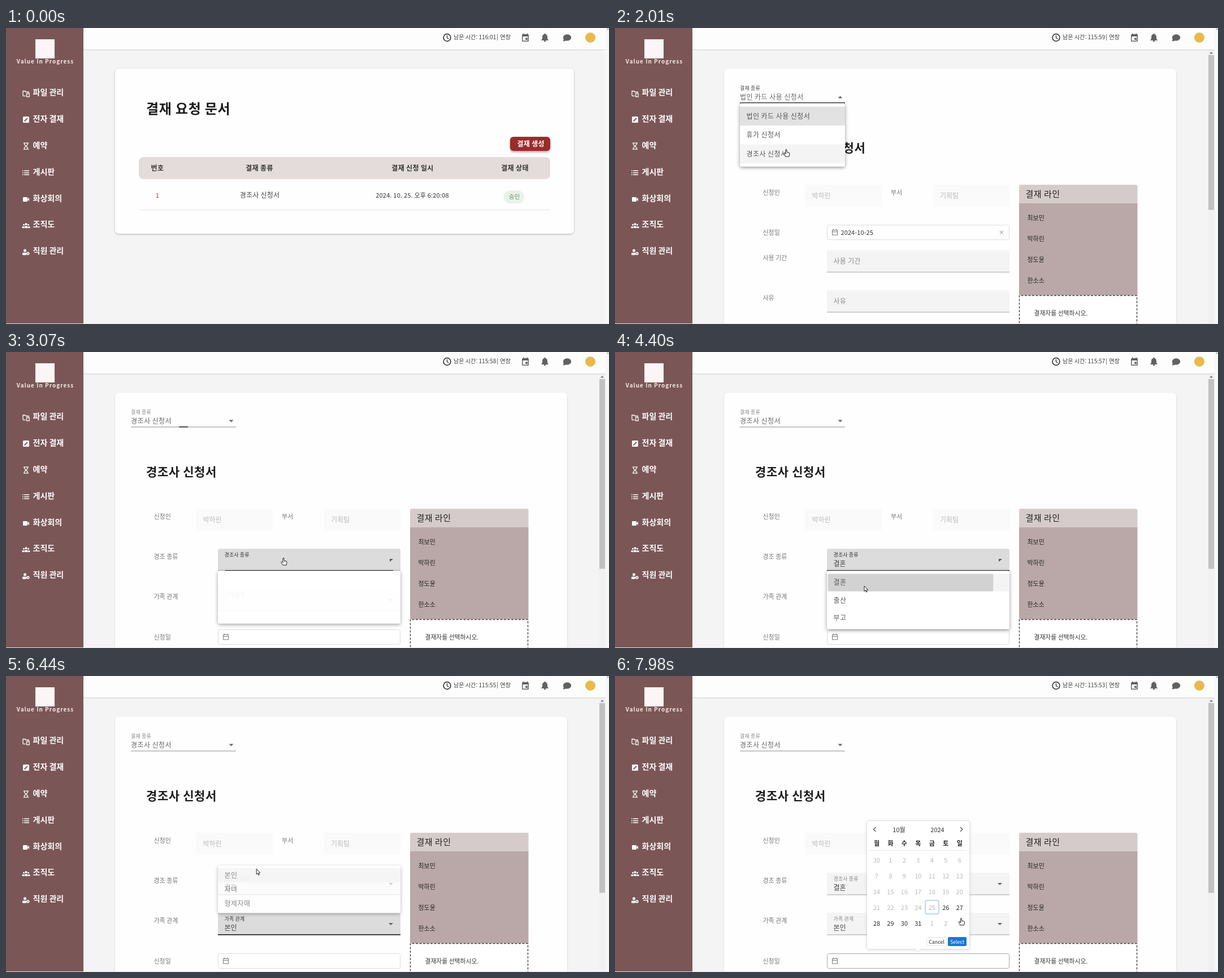
An HTML page with a canvas for the animation above (8 s loop, 1067 by 525 pixels).

```html
<!DOCTYPE html>
<html lang="ko">
<head>
<meta charset="utf-8">
<title>결재 신청</title>
<style>
html, body { margin: 0; width: 100%; height: 100%; overflow: hidden; background: #f4f4f4; }
canvas { display: block; width: 1067px; height: 525px; }
</style>
</head>
<body>
<canvas id="stage" width="1067" height="525"></canvas>
<script>
const g = document.getElementById('stage').getContext('2d');
const LOOP = 8000;
const FONT = '"Noto Sans CJK KR", "Noto Sans CJK", "Noto Sans", sans-serif';
const USER = '박하린', TEAM = '기획팀';
const APPROVERS = ['최보민', USER, '정도윤', '한소소'];
const SIDE = ['파일 관리', '전자 결재', '예약', '게시판', '화상회의', '조직도', '직원 관리'];
const DOCS = ['법인 카드 사용 신청서', '휴가 신청서', '경조사 신청서'];

// Pointer path: time, x, y of the tip
const PATH = [
  [70, 1038, 497], [850, 930, 205], [1060, 930, 205], [1450, 303, 122], [1680, 303, 122],
  [1810, 303, 215], [2400, 303, 215], [2800, 491, 365], [3140, 491, 365], [3750, 441, 412],
  [4000, 441, 412], [4400, 441, 415], [4750, 441, 440], [5400, 441, 440], [5620, 441, 411],
  [6080, 441, 330], [6350, 441, 330], [6900, 470.5, 497], [7700, 470.5, 497], [7980, 612.5, 429]
];
const HAND = [[800, 1060], [1420, 2400], [2720, 3200], [3600, 4340], [4690, 5430],
  [5680, 6300], [6860, 7740], [7850, LOOP]];
const CLICKS = [930, 1500, 2270, 2890, 4250, 5370, 6210, 7080];

const clamp = v => Math.max(0, Math.min(1, v));
const ramp = (t, from, len) => clamp((t - from) / len);
const out = p => 1 - (1 - p) * (1 - p);
const smooth = p => p * p * (3 - 2 * p);
const within = (t, a, b) => t >= a && t < b;

function rect(x, y, w, h, fill) {
  g.fillStyle = fill;
  g.fillRect(x, y, w, h);
}

function box(x, y, w, h, r, fill, stroke) {
  g.beginPath();
  g.roundRect(x, y, w, h, r);
  if (fill) { g.fillStyle = fill; g.fill(); }
  if (stroke) { g.strokeStyle = stroke; g.lineWidth = 1; g.stroke(); }
}

// The shadow is kept outside the box so translucent boxes stay clean
function raised(x, y, w, h, r, fill, blur, dy, alpha) {
  g.save();
  g.beginPath();
  g.rect(-100, -600, 1300, 1800);
  g.roundRect(x, y, w, h, r);
  g.clip('evenodd');
  g.shadowColor = `rgba(0,0,0,${alpha})`;
  g.shadowBlur = blur;
  g.shadowOffsetY = dy;
  box(x, y, w, h, r, fill);
  g.restore();
  box(x, y, w, h, r, fill);
}

function disc(x, y, r, fill) {
  g.beginPath();
  g.arc(x, y, r, 0, 7);
  g.fillStyle = fill;
  g.fill();
}

function poly(pts, fill) {
  g.beginPath();
  for (let i = 0; i < pts.length; i += 2) g.lineTo(pts[i], pts[i + 1]);
  g.closePath();
  g.fillStyle = fill;
  g.fill();
}

function line(pts, color, width = 1) {
  g.beginPath();
  for (let i = 0; i < pts.length; i += 2) g.lineTo(pts[i], pts[i + 1]);
  g.strokeStyle = color;
  g.lineWidth = width;
  g.stroke();
}

// y is the visual middle of the line
function text(s, x, y, size, color, { weight = 400, gap = 0, align = 'left' } = {}) {
  g.font = `${weight} ${size}px ${FONT}`;
  g.letterSpacing = gap + 'px';
  g.textAlign = align;
  g.fillStyle = color;
  g.fillText(s, x, y + size * 0.37);
}

function caret(x, y, up, color = '#666') {
  const d = up ? -2 : 2;
  poly([x - 4, y - d, x + 4, y - d, x, y + d], color);
}

const ICONS = [
  () => {
    line([1, 10, 1, 2, 5, 2, 6, 3.5, 11, 3.5, 11, 5], '#fff', 1.3);
    line([1, 10.5, 6, 10.5], '#fff', 1.3);
    g.strokeStyle = '#fff';
    g.strokeRect(7.6, 6, 4.5, 6);
  },
  () => { box(1, 1, 11, 11, 1.5, '#fff'); line([3.5, 9.5, 9, 4], '#7b5656', 1.8); },
  () => {
    line([2, 1, 11, 1], '#fff', 1.3);
    line([2, 12, 11, 12], '#fff', 1.3);
    line([3.4, 1, 3.4, 3.5, 9.4, 9.5, 9.4, 12], '#fff', 1.2);
    line([9.4, 1, 9.4, 3.5, 3.4, 9.5, 3.4, 12], '#fff', 1.2);
  },
  () => {
    for (const y of [2.5, 6, 9.5]) { rect(0, y, 1.6, 1.5, '#fff'); rect(3, y, 9, 1.5, '#fff'); }
  },
  () => { box(1, 3, 8, 8, 1, '#fff'); poly([9, 6.5, 12, 3.8, 12, 10.2, 9, 7.5], '#fff'); },
  () => {
    for (const [x, y, r] of [[2.5, 5, 1.5], [10.5, 5, 1.5], [6.5, 4, 2]]) disc(x, y, r, '#fff');
    box(-0.5, 8, 4, 3, 1, '#fff');
    box(9.5, 8, 4, 3, 1, '#fff');
    box(3.8, 7.2, 5.4, 3.8, 1.5, '#fff');
  },
  () => {
    disc(4.5, 3.8, 2.5, '#fff');
    box(0, 7.5, 7, 4.3, 1.5, '#fff');
    disc(9.8, 9, 2.8, '#fff');
    disc(9.8, 9, 1, '#7b5656');
  }
];

function sidebar() {
  rect(0, 0, 137, 525, '#7b5656');
  rect(52, 20, 34, 34, '#fbf6f5');
  text('Value In Progress', 69.5, 59.5, 10, '#f3e8e6', { weight: 700, gap: 1, align: 'center' });
  SIDE.forEach((label, i) => {
    const y = 114 + i * 46.85;
    g.save();
    g.translate(29, Math.round(y - 4.5));
    ICONS[i]();
    g.restore();
    text(label, 47.5, y, 14, '#fff', { weight: 700 });
  });
}

function header(t) {
  rect(137, 0, 930, 48, '#fdfdfd');
  box(137, 40, 924, 500, 8, '#f4f4f4');
  rect(137, 38.3, 924, 1.2, '#cfcfcf');
  rect(1061, 0, 6, 525, '#f7f7f7');
  poly([1063, 3, 1067, 3, 1065, 0.5], '#999');

  g.beginPath();
  g.arc(780.5, 17, 6.4, 0, 7);
  g.strokeStyle = '#222';
  g.lineWidth = 1.5;
  g.stroke();
  line([780.5, 13, 780.5, 17.5, 783.5, 19.2], '#222', 1.2);

  const left = 6961 - Math.floor((t + 290) / 1000);
  const clock = Math.floor(left / 60) + ':' + String(left % 60).padStart(2, '0');
  text('남은 시간: ' + clock, 792, 16.5, 10.1, '#3c3c3c');
  rect(869, 11, 1, 11, '#777');
  text('연장', 874, 16.5, 10.4, '#3c3c3c');

  const ink = '#616161';
  box(913, 11, 12, 13, 1.5, ink);
  rect(914.5, 15, 9, 7.5, '#fff');
  rect(915, 9.5, 1.5, 2, ink);
  rect(921.5, 9.5, 1.5, 2, ink);
  rect(919.2, 17.5, 3.6, 3.6, ink);

  box(949, 11, 9, 10, [4.5, 4.5, 0, 0], ink);
  poly([949, 19, 958, 19, 960, 22, 947, 22], ink);
  disc(953.5, 11, 1.3, ink);
  disc(953.5, 23, 1.6, ink);

  g.beginPath();
  g.ellipse(993, 17, 7.2, 5.8, 0, 0, 7);
  g.fill();
  poly([987, 18, 986, 24, 992, 22], ink);
  disc(1034, 17, 9, '#e9b94a');
}

function listPage(t) {
  raised(193, 72, 812, 293, 7, '#fefefe', 3, 1, 0.3);
  text('결재 요청 문서', 248, 143, 24, '#1c1c1c', { weight: 700, gap: 0.75 });
  raised(892, 193, 71, 25, 6, t > 800 ? '#7f2022' : '#9b2b2d', 4, 2, 0.35);
  text('결재 생성', 904.5, 205.5, 12, '#fff', { weight: 700, gap: 0.3 });
  box(235, 229, 728, 39, 8, '#e4dbdb');
  const head = { weight: 700, gap: 0.35, align: 'center' };
  text('번호', 268, 248.5, 12, '#333', head);
  text('결재 종류', 448.5, 248.5, 12, '#333', head);
  text('결재 신청 일시', 719.5, 248.5, 12, '#333', head);
  text('결재 상태', 900.5, 248.5, 12, '#333', head);
  const mid = { gap: 0.2, align: 'center' };
  text('1', 268, 297, 11, '#7c4038', mid);
  text('경조사 신청서', 449, 296.5, 12, '#444', mid);
  text('2024. 10. 25. 오후 6:20:08', 719, 297, 11, '#333', mid);
  box(881, 288, 36, 23, 11.5, '#e7f3e9');
  text('승인', 899.5, 299.5, 10.6, '#6c8a70', { align: 'center' });
  rect(235, 322, 728, 1, '#e4e4e4');
}

function menu(x, y, w, items, t, from, to, { up = false, picked = -1, hover = -1, pressed = false } = {}) {
  if (!within(t, from, to + 300)) return;
  const open = out(ramp(t, from, 210)), shut = ramp(t, to, 300);
  const k = (0.5625 + 0.4375 * open) * (1 - 0.4375 * shut);
  const full = 112, top = up ? y + full * (1 - k) : y;
  g.save();
  g.globalAlpha = (0.75 + 0.25 * open) * (1 - shut * shut);
  raised(x, top, w, full * k, 3, '#fff', 6, 2, 0.42);
  items.forEach((s, i) => {
    const ry = top + (6 + 33.5 * i) * k, rh = 33.5 * k;
    if (i === picked) rect(x, ry, w, rh, '#e2e2e2');
    else if (i === hover) rect(x, ry, w, rh, '#f4f4f4');
    if (i === hover && pressed && shut) box(x + 2, ry, w * 0.905, rh, 2, '#d1d1d1');
    if (open > 0.7) text(s, x + 11.5, ry + rh / 2, 12, '#555', { gap: 0.45 });
  });
  g.restore();
}

function filled(y, label, value, { bg = '#f4f4f4', bar = 0, arrow = 'down', dark = false, edge = '#a5a5a5' }) {
  box(375, y, 323, 39, [3, 3, 0, 0], bg);
  rect(375, y + 38.5, 323, 1, edge);
  if (bar) rect(536.5 - 161.5 * bar, y + 38, 323 * bar, 1.6, '#222');
  text(label, 386.5, y + 10.5, 9, dark ? '#333' : '#888', { gap: 0.1 });
  if (value) text(value, 386.5, y + 27, 12, '#444');
  if (arrow === 'half') poly([679, y + 18, 685, y + 18, 679, y + 23], '#555');
  else caret(681, y + 20, arrow === 'up');
}

function dateBox(y, edge, value) {
  box(375.5, y + 0.5, 322, 26, 3, '#fff', edge);
  g.strokeStyle = '#777';
  g.strokeRect(384.5, y + 9.5, 9, 8.5);
  line([384, y + 12.5, 394, y + 12.5], '#777');
  line([386.5, y + 7.5, 386.5, y + 10], '#777');
  line([391.5, y + 7.5, 391.5, y + 10], '#777');
  if (!value) return;
  text(value, 399.5, y + 13.5, 11, '#333', { gap: 0.1 });
  line([681, y + 10.5, 687, y + 16.5], '#777');
  line([687, y + 10.5, 681, y + 16.5], '#777');
}

function cardForm() {
  text('신청일', 261.5, 363, 11, '#777');
  dateBox(349, '#dcdcdc', '2024-10-25');
  [['사용 기간', 394], ['사유', 465]].forEach(([s, y]) => {
    text(s, 261.5, y + 14, 11, '#777');
    box(375, y, 323, 39, [3, 3, 0, 0], '#f4f4f4');
    rect(375, y + 38.5, 323, 1, '#a5a5a5');
    text(s, 386.5, y + 19.5, 12, '#888', { gap: 0.3 });
  });
}

function eventForm(t) {
  text('경조 종류', 261.5, 363, 11, '#777');
  text('가족 관계', 261.5, 434, 11, '#777');
  text('신청일', 261.5, 505.5, 11, '#777');

  const focus1 = within(t, 2920, 5380), focus2 = within(t, 5380, 7200);
  const hover1 = within(t, 2740, 2920), hover2 = within(t, 4690, 5380);
  const shrink = p => 1 - p * p;
  filled(349, '경조사 종류', t > 4330 ? '결혼' : '', {
    bg: focus1 ? '#dcdcdc' : hover1 ? '#ececec' : '#f4f4f4',
    bar: out(ramp(t, 2920, 210)) * shrink(ramp(t, 5380, 210)),
    arrow: within(t, 2990, 4450) ? 'half' : 'down',
    dark: focus1
  });
  filled(420, '가족 관계', t > 6260 ? '본인' : '', {
    bg: focus2 ? '#dcdcdc' : hover2 ? '#ececec' : '#f4f4f4',
    bar: out(ramp(t, 5380, 210)) * shrink(ramp(t, 7120, 210)),
    arrow: within(t, 5400, 6270) ? 'up' : 'down',
    dark: focus2,
    edge: hover2 ? '#333' : '#a5a5a5'
  });
  dateBox(492, t > 6870 ? '#a8a8a8' : '#dcdcdc');
}

function approvers() {
  box(715, 278, 209.5, 34, [3, 3, 0, 0], '#d6cbcb');
  text('결재 라인', 726.5, 294.5, 15, '#222', { gap: 0.5 });
  box(715, 311, 209.5, 163, [0, 0, 3, 3], '#baa8a8');
  APPROVERS.forEach((s, i) => text(s, 729.5, 336.5 + i * 37.2, 11, '#262222'));
  rect(715, 474, 209, 51, '#fff');
  g.setLineDash([4, 2.5]);
  line([715.5, 530, 715.5, 474.5, 923.5, 474.5, 923.5, 530], '#4f3f3f', 1.4);
  g.setLineDash([]);
  text('결재자를 선택하시오.', 741.5, 506.5, 10.8, '#333');
}

function calendar(t) {
  const p = out(ramp(t, 7230, 180));
  if (!p) return;
  g.save();
  g.globalAlpha = p;
  g.translate(0, 488);
  g.scale(1, 0.8 + 0.2 * p);
  g.translate(0, -488);
  raised(445, 256, 183, 229, 4, '#fff', 5, 1, 0.12);
  box(445.5, 256.5, 182, 228, 4, '#fff', '#e0e0e0');
  poly([531, 484, 541, 484, 536, 489.5], '#fff');
  line([531, 484.5, 536, 489.5, 541, 484.5], '#dedede');
  line([461.5, 268, 457.5, 272, 461.5, 276], '#555', 1.3);
  line([611, 268, 615, 272, 611, 276], '#555', 1.3);
  const mid = { align: 'center' };
  text('10월', 502.5, 272.5, 11, '#333', mid);
  text('2024', 570.5, 272.5, 11, '#333', mid);
  [...'월화수목금토일'].forEach((d, i) =>
    text(d, 463 + 24.45 * i, 296.5, 11, '#222', { weight: 700, align: 'center' }));
  rect(451, 309, 171, 1, '#e6e6e6');
  box(549, 398, 24, 24, 2, '#fff', '#79b0e6');
  for (let i = 0; i < 35; i++) {
    const day = i === 0 ? 30 : i > 31 ? i - 31 : i;
    const free = i > 25 && i < 32;
    text(String(day), 463 + 24.45 * (i % 7), 326.5 + 28 * Math.floor(i / 7), 11, free ? '#2b2b2b' : '#b9b9b9', mid);
  }
  box(551.5, 463.5, 35, 15, 2, '#fcfcfc', '#e6e6e6');
  text('Cancel', 569, 471.5, 8.8, '#333', mid);
  box(589, 463, 33, 16, 2, '#1b76d2');
  text('Select', 605.5, 471.5, 8.8, '#fff', mid);
  g.restore();
}

function formPage(t) {
  const event = t >= 2340;
  raised(193, 72, 800, 480, 7, '#fefefe', 3, 1, 0.16);
  rect(1049, 40, 12, 485, '#f1f1f1');
  rect(1050, 48, 10, event ? 336.5 : 274.5, '#c1c1c1');
  poly([1052, 45.5, 1058, 45.5, 1055, 42], '#777');

  const focused = within(t, 1500, 2870);
  text('결재 종류', 221, 106.5, 9, focused ? '#444' : '#888', { gap: 0.15 });
  text(DOCS[event ? 2 : 0], 221, 122.5, 12, '#666', { gap: 0.45 });
  caret(398.5, 122.5, within(t, 1520, 2340));
  rect(221, 132.5, 186, 1, '#8d8d8d');
  const p = ramp(t, 2870, 210);
  const bar = 186 * out(ramp(t, 1500, 200)) * (1 - p * p);
  if (bar) rect(314 - bar / 2, 132, bar, 1.5, '#222');

  text(DOCS[event ? 2 : 0], 248, 212, 21, '#1c1c1c', { weight: 700, gap: 0.6 });
  text('신청인', 261.5, 291.5, 11, '#777');
  rect(336, 278, 136, 39, '#fafafa');
  text(USER, 348.5, 297.5, 12, '#bababa');
  text('부서', 488, 291.5, 11, '#777');
  rect(563, 278, 135, 39, '#fafafa');
  text(TEAM, 575, 297.5, 12, '#bababa');
  approvers();
  if (event) eventForm(t); else cardForm();

  menu(221, 133.5, 186, DOCS, t, 1520, 2320, { picked: 0, hover: t > 1780 ? 2 : -1 });
  menu(375, 388, 323, ['결혼', '출산', '부고'], t, 2990, 4350, { hover: t > 3600 ? 0 : -1, pressed: true });
  menu(375, 308.2, 323, ['본인', '자녀', '형제자매'], t, 5390, 6270,
    { up: true, hover: t > 5960 ? 0 : within(t, 5680, 5820) ? 2 : within(t, 5820, 5960) ? 1 : -1 });
  calendar(t);
}

function pointer(t) {
  if (t < PATH[0][0]) return;
  let i = 0;
  while (i < PATH.length - 2 && t >= PATH[i + 1][0]) i++;
  const [t0, x0, y0] = PATH[i], [t1, x1, y1] = PATH[i + 1];
  const p = smooth(ramp(t, t0, t1 - t0));
  const x = x0 + (x1 - x0) * p, y = y0 + (y1 - y0) * p;
  if (CLICKS.some(c => within(t, c, c + 140))) disc(x, y, 8, 'rgba(255,236,70,.8)');
  g.save();
  g.translate(x, y);
  const hand = HAND.some(([a, b]) => within(t, a, b));
  const shape = hand
    ? 'M-1 1Q0-.5 1 1V5L5 6Q6.3 6.5 6 8L5 13H-1L-4 8.5Q-4.3 6.5-2.5 7L-1 8.5Z'
    : 'M0 0V9.5L2.2 7.6 3.8 11 5.2 10.3 3.7 7.1 6.6 6.8Z';
  const path = new Path2D(shape);
  g.fillStyle = '#fff';
  g.fill(path);
  g.strokeStyle = '#222';
  g.lineWidth = 1;
  g.lineJoin = 'round';
  g.stroke(path);
  if (hand) line([1.6, 6, 1.6, 8], '#555', 0.7);
  g.restore();
}

function draw(t) {
  rect(0, 0, 1067, 525, '#f4f4f4');
  header(t);
  if (t < 1060) listPage(t); else formPage(t);
  sidebar();
  rect(0, 524, 1067, 1, '#e6e6e6');
  pointer(t);
}

const start = performance.now();
function tick() {
  draw((performance.now() - start) % LOOP);
  requestAnimationFrame(tick);
}
tick();
</script>
</body>
</html>
```
